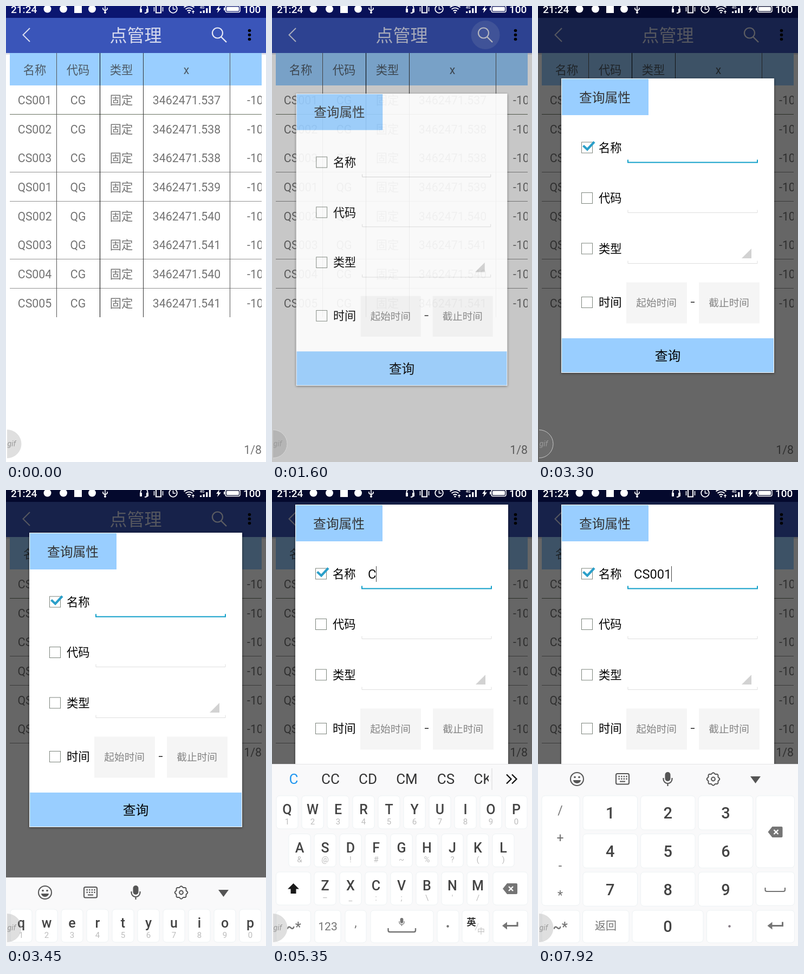
Recreate the animation shown at these times as an HTML page. Size 480 px wide and 844 px high, loop 8000 ms.

```html
<!DOCTYPE html>
<html lang="zh">
<head>
<meta charset="utf-8">
<title>点管理</title>
<style>
html, body { margin: 0; width: 100%; height: 100%; overflow: hidden; background: #fff; }
svg { display: block; width: 480px; height: 844px; }
text { font-family: Roboto, "Noto Sans CJK SC", sans-serif; white-space: pre; }
</style>
</head>
<body>
<svg id="stage" viewBox="0 0 480 844" xmlns="http://www.w3.org/2000/svg"></svg>
<script>
const NS = 'http://www.w3.org/2000/svg';
const stage = document.getElementById('stage');
const LOOP = 8000;
const BLUE = '#99ceff', GREY = '#747474', INK = '#444';

function el(parent, tag, attrs = {}) {
  const node = document.createElementNS(NS, tag);
  for (const k in attrs) node.setAttribute(k, attrs[k]);
  return parent.appendChild(node);
}
const group = (p, attrs) => el(p, 'g', attrs);
const rect = (p, x, y, w, h, fill, more) => el(p, 'rect', { x, y, width: w, height: h, fill, ...more });
const circle = (p, cx, cy, r, fill, more) => el(p, 'circle', { cx, cy, r, fill, ...more });
const shape = (p, d, fill) => el(p, 'path', { d, fill });
const line = (p, d, stroke, width = 1, more) =>
  el(p, 'path', { d, fill: 'none', stroke, 'stroke-width': width, ...more });
// y is the middle of the capitals
function label(p, str, x, y, size, fill, anchor = 'middle', weight = 400) {
  const node = el(p, 'text', {
    x, y: y + size * 0.36, 'font-size': size, fill, 'text-anchor': anchor, 'font-weight': weight
  });
  node.textContent = str;
  return node;
}
function clip(id, x, y, w, h) {
  return rect(el(el(stage, 'defs'), 'clipPath', { id }), x, y, w, h, '#000');
}
const show = (node, on) => node.setAttribute('display', on ? 'inline' : 'none');
const within = (t, ...spans) => spans.some(([a, b]) => t >= a && t < b);
// latest entry of [time, ...values] that has started
const latest = (steps, t) => steps.filter(s => s[0] <= t).pop();

// ---- point list ----
const app = group(stage);
rect(app, 0, 0, 480, 844, '#fff');
rect(app, 0, 87, 480, 3, '#dde0ea');
rect(app, 0, 0, 480, 22, '#0b1670');
rect(app, 0, 22, 480, 65, '#3a55b9');
const touch = circle(app, 394, 53.5, 26.5, '#fff', { opacity: 0.12 });
line(app, 'M44 41L31.5 53.5L44 66', '#d8dcf0', 2);
label(app, '点管理', 239.5, 54, 32, '#d6daee');
circle(app, 390.5, 50, 9.5, 'none', { stroke: '#e8eaf6', 'stroke-width': 2.2 });
line(app, 'M397 57L407 67', '#e8eaf6', 2.4);
[45.5, 53.5, 61.5].forEach(y => circle(app, 449.5, y, 2.8, '#000'));

const tableClip = clip('table', 7, 87, 465, 757);
const table = group(app, { 'clip-path': 'url(#table)' });
rect(table, 7, 87, 465, 60, BLUE);
['名称', '代码', '类型', 'x'].forEach((s, i) => label(table, s, [53, 133, 213, 333][i], 118, 21.3, '#4d5a66'));
const points = ['CS001', 'CS002', 'CS003', 'QS001', 'QS002', 'QS003', 'CS004', 'CS005'];
const tails = [537, 538, 538, 539, 540, 541, 540, 541];
points.forEach((name, i) => {
  const y = 174.5 + 53.65 * i;
  label(table, name, 53, y, 21.3, GREY);
  label(table, name[0] + 'G', 133, y, 21.3, GREY);
  label(table, '固定', 213, y, 21.3, GREY);
  label(table, '3462471.' + tails[i], 333.5, y, 21.3, GREY);
  label(table, '-10', 445, y, 21.3, GREY, 'start');
});
[200, 307, 361, 468, 522].forEach((y, i) => line(table, `M7 ${y + 0.5}H472`, i ? '#929292' : '#66705f'));
[93, 173, 253, 413].forEach((x, i) => line(table, `M${x + 0.5} 87V576`, ['#555', '#000', '#333', '#555'][i]));
const pager = label(app, '1/8', 472, 821.5, 21.3, GREY, 'end');

const dim = rect(stage, 0, 0, 480, 844, '#000');

// ---- query dialog, drawn where it rests above the keyboard ----
const dialog = group(stage, { style: 'filter:drop-shadow(0 1px 2px rgba(0,0,0,.5))' });
rect(dialog, 43, 27, 393, 545, '#fff');
rect(dialog, 44, 28, 160, 67, BLUE);
label(dialog, '查询属性', 123.5, 62, 23.8, '#333');
const press = circle(dialog, 90, 155, 21, '#000', { opacity: 0.12 });
[155, 248.5, 342, 441.5].forEach((y, i) => {
  rect(dialog, 80.5, y - 10, 20, 20, '#fff', { stroke: '#7c847c' });
  label(dialog, ['名称', '代码', '类型', '时间'][i], 112, y, 21.3, '#000', 'start');
});
const field = (y, color, w) => line(dialog, `M166 ${y - 5}V${y}H405V${y - 5}`, color, w);
const idle = field(182.5, '#d3d3d3', 1);
const active = field(182.5, '#119fc9', 2);
field(275.5, '#dedede', 1);
field(369.5, '#dedede', 1);
const tick = line(dialog, 'M83.5 151.5L91 158.5L104 144.5', '#2b9fc9', 4.2);
shape(dialog, 'M394 342V360H376Z', '#d2d2d2');
[[163, '起始时间'], [297, '截止时间']].forEach(([x, s]) => {
  rect(dialog, x, 404.5, 112, 76, '#f5f5f5');
  label(dialog, s, x + 55.7, 442, 18.7, '#858585');
});
rect(dialog, 282, 440.5, 7, 1.5, '#222');
rect(dialog, 44, 508, 391, 63, BLUE);
label(dialog, '查询', 239.5, 540, 23.8, '#000');
const input = label(dialog, '', 177, 155.5, 23.7, '#111', 'start');
const caret = rect(dialog, 0, 141, 1, 29, '#444');

// ---- keyboard ----
const keyboard = group(stage);
rect(keyboard, 0, 507, 480, 337, '#f9f9fa');
line(keyboard, 'M0 507.5H480', '#e4e4e6');

const key = (p, x, y, w, h) => rect(p, x, y, w, h, '#fff', { rx: 6, stroke: '#edf2f4' });
function backspace(p, x, y) {
  shape(p, `M${x - 14} ${y}L${x - 6} ${y - 10}H${x + 11}Q${x + 13} ${y - 10} ${x + 13} ${y - 8}V${y + 8}Q${x + 13} ${y + 10} ${x + 11} ${y + 10}H${x - 6}Z`, '#757575');
  line(p, `M${x - 3} ${y - 4}l8 8m0 -8l-8 8`, '#fff', 2.4);
}
function enter(p, x, y) {
  line(p, `M${x - 8} ${y}H${x + 13}V${y - 7}`, '#757575', 3);
  shape(p, `M${x - 15} ${y}l9 -7v14Z`, '#757575');
}
function mic(p, x, y, k, color) {
  const g = group(p, { transform: `translate(${x} ${y}) scale(${k})` });
  rect(g, -5, -13, 10, 17, color, { rx: 5 });
  line(g, 'M-8 -2V0A8 8 0 0 0 8 0V-2M0 8V13', color, 2.2);
}

const tools = group(keyboard);
circle(tools, 72, 535, 12, 'none', { stroke: '#555', 'stroke-width': 2 });
circle(tools, 68, 531.5, 1.8, '#555');
circle(tools, 76, 531.5, 1.8, '#555');
shape(tools, 'M65 537H79A7 6 0 0 1 65 537Z', '#555');
rect(tools, 144, 525, 24, 19.5, 'none', { rx: 2.5, stroke: '#555', 'stroke-width': 2 });
for (let i = 0; i < 8; i++) rect(tools, 148.5 + (i % 4) * 4.6, 529 + (i >> 2) * 4.5, 2.4, 2.4, '#555');
rect(tools, 151, 538.5, 10, 2, '#555');
mic(tools, 239.5, 535, 1, '#555');
let cog = '';
for (let i = 0; i <= 64; i++) {
  const a = i / 64 * 2 * Math.PI, r = 10.8 + Math.cos(8 * a);
  cog += `${i ? 'L' : 'M'}${323.5 + r * Math.cos(a)} ${535 + r * Math.sin(a)}`;
}
line(tools, cog + 'Z', '#555', 2);
circle(tools, 323.5, 535, 3.4, 'none', { stroke: '#555', 'stroke-width': 2 });
shape(tools, 'M392 530H411L401.5 543Z', '#555');

clip('words', 0, 510, 400, 50);
const words = group(keyboard);
const list = group(words, { 'clip-path': 'url(#words)' });
[['C', 40], ['CC', 108], ['CD', 177], ['CM', 249], ['CS', 321], ['CK', 389]].forEach(([s, x], i) =>
  label(list, s, x, 535, 26, i ? '#333' : '#1e96f0'));
line(words, 'M406 515V555', '#d8d8d8');
line(words, 'M433 526.5L441.5 535L433 543.5M443 526.5L451.5 535L443 543.5', '#111', 2.3);

const letters = group(keyboard);
const caps = [];
[['qwertyuiop', '1234567890', 28, 566], ['asdfghjkl', '&@!#~%?()', 51, 636.5], ['zxcvbnm', '–_:;\\\'/', 98, 707]]
  .forEach(([row, hints, x0, y]) => [...row].forEach((ch, i) => {
    const x = x0 + 47 * i;
    key(letters, x - 20, y, 40, 61);
    caps.push([label(letters, '', x, y + 25, 25, INK, 'middle', 500), ch]);
    label(letters, hints[i], x, y + 47.5, 15, '#bcbcbc');
  }));
const shiftKey = key(letters, 7.5, 707, 64, 61);
const shiftArrow = shape(letters, 'M39.5 728L50 738.5H44.5V747H34.5V738.5H29Z', GREY);
key(letters, 408, 707, 64, 61);
backspace(letters, 440, 738);
[[7.5, 64], [79, 48], [135, 39], [182, 116], [305, 40], [351, 50], [408, 64]].forEach(([x, w]) => key(letters, x, 778, w, 60));
label(letters, '~*', 40, 809, 25, GREY, 'middle', 500);
label(letters, '123', 103, 807, 21, GREY);
label(letters, ',', 154.5, 800, 22, GREY);
const english = label(letters, 'English', 239.5, 807, 20, '#333', 'middle', 500);
const spaceIcon = group(letters);
mic(spaceIcon, 239.5, 799.5, 0.58, GREY);
line(spaceIcon, 'M214.5 811V815Q214.5 818 217.5 818H262Q265 818 265 815V811', GREY, 2.4);
circle(letters, 324.5, 807.5, 2.2, GREY);
label(letters, '英', 368, 800, 17.5, '#333', 'middle', 700);
line(letters, 'M375 815L381 802', '#c4c4c4');
label(letters, '中', 386, 815.5, 14, '#c0c0c0');
enter(letters, 440, 806.5);

const pad = group(keyboard);
key(pad, 7, 566, 70, 203);
['/', '+', '-', '*'].forEach((s, i) => label(pad, s, 41, 592.5 + 51 * i + (i > 2 ? 4 : 0), 23, GREY));
const digitKeys = [];
function digit(n, x, y, w, h) {
  digitKeys[n] = key(pad, x, y, w, h);
  label(pad, n, x + w / 2, y + h / 2 + 0.5, 29, INK, 'middle', 500);
}
for (let i = 0; i < 9; i++) digit(i + 1, 83 + (i % 3) * 106.6, 566 + Math.floor(i / 3) * 70.6, 100.5, 63);
key(pad, 402.5, 566, 71, 133);
backspace(pad, 438.5, 633);
key(pad, 402.5, 707, 71, 62);
line(pad, 'M419.5 736V740Q419.5 743 422.5 743H453Q456 743 456 740V736', GREY, 2.2);
key(pad, 7, 778, 70, 60);
label(pad, '~*', 41, 809, 25, GREY, 'middle', 500);
key(pad, 82.5, 778, 85.5, 60);
label(pad, '返回', 125, 807, 20, GREY);
digit(0, 174, 778, 131, 59);
key(pad, 311.5, 778, 85, 60);
circle(pad, 353.5, 807.5, 2.2, '#857a85');
key(pad, 402.5, 778, 71, 60);
enter(pad, 438.5, 806.5);

const bubble = group(keyboard);
rect(bubble, -33, 0, 66, 70, '#fff', { rx: 8, stroke: '#e2e2e2' });
const bubbleText = label(bubble, '', 0, 34, 32, INK, 'middle', 500);

// ---- floating recorder button ----
clip('edge', 2, 780, 40, 62);
const recorder = group(stage, { 'clip-path': 'url(#edge)' });
circle(recorder, 2, 810.5, 26, '#808080', { 'fill-opacity': 0.25, stroke: '#ddd', 'stroke-opacity': 0.8 });
label(recorder, 'gif', 2.5, 810, 14, '#9a9a9a', 'start').setAttribute('font-style', 'italic');

// ---- status bar ----
const bar = group(stage);
label(bar, '21:24', 9, 6, 19, '#fff', 'start', 500);
[76.5, 106, 159].forEach(x => circle(bar, x, 5.5, 7, '#fff'));
rect(bar, 126, -1, 14, 14, '#fff');
line(bar, 'M183 0V12M179 3V6L183 9L187 6V3', '#fff', 1.6);
circle(bar, 183, 12, 2, '#fff');
line(bar, 'M248.5 7V4A6.5 6.5 0 0 1 261.5 4V10Q261 13 256 13', '#fff', 1.8);
rect(bar, 247, 5, 4, 7, '#fff', { rx: 1 });
rect(bar, 259, 5, 4, 7, '#fff', { rx: 1 });
rect(bar, 277, -1, 9, 13.5, 'none', { stroke: '#fff', 'stroke-width': 2 });
line(bar, 'M273.5 2V10M289.5 2V10', '#fff', 1.6);
circle(bar, 308.5, 5.5, 7.3, 'none', { stroke: '#fff', 'stroke-width': 1.8 });
line(bar, 'M308.5 1V6H313', '#fff', 1.6);
line(bar, 'M328.5 2.5Q338 -4.5 347.5 2.5M331.5 6Q338 1 344.5 6M334.5 9.3Q338 6.8 341.5 9.3', '#fff', 1.9);
circle(bar, 338, 12, 1.6, '#fff');
const traffic = shape(bar, 'M342.5 11L345.5 8L348.5 11H346.3V14H344.7V11Z', '#fff');
label(bar, '4G', 362, 2, 7, '#fff', 'middle', 500);
[3, 5, 9, 14].forEach((h, i) => rect(bar, 358 + i * 5.6, 13 - h, 3.2, h, '#fff'));
shape(bar, 'M394 -1L388 7H391.5L390 13L397 4.5H393Z', '#fff');
rect(bar, 405, -0.5, 27, 12, 'none', { rx: 3, stroke: '#fff', 'stroke-width': 1.5 });
rect(bar, 407, 1.5, 23, 8, '#fff', { rx: 1.5 });
rect(bar, 402, 3, 2.5, 5, '#fff');
label(bar, '100', 438, 6, 19, '#fff', 'start', 500);

// ---- timeline ----
// time, scale, opacity, dimming
const opening = [[0, 1, 0, 0], [1420, 0.93, 0.25, 0.04], [1510, 0.97, 0.65, 0.12],
  [1600, 0.992, 0.91, 0.22], [1690, 1, 1, 0.48], [1880, 1, 1, 0.6]];
// time, dialog offset, keyboard offset
const rising = [[0, 133, 340], [3300, 107, 340], [3400, 52, 210], [3480, 18, 90], [3560, 4, 30], [3650, 0, 6], [3730, 0, 0]];
const typed = [[0, ''], [5180, 'C'], [6530, 'CS'], [7180, 'CS0'], [7430, 'CS00'], [7920, 'CS001']];
const flips = [560, 2900, 4280, 5090, 6380, 7520];
const popups = [[5000, 5180, 'C', 192, 616], [6320, 6380, 'S', 98, 545]];

function draw(t) {
  const [, scale, alpha, dark] = latest(opening, t);
  const [, lift, drop] = latest(rising, t);
  show(touch, within(t, [770, 1690]));
  dim.setAttribute('opacity', dark);
  dialog.setAttribute('opacity', alpha);
  show(dialog, alpha > 0);
  dialog.setAttribute('transform', `translate(239.5 432) scale(${scale}) translate(-239.5 ${lift - 432})`);

  const focused = t >= 2380;
  show(press, within(t, [2380, 2480]));
  show(tick, focused);
  show(active, focused);
  show(idle, !focused);
  input.textContent = latest(typed, t)[1];
  const end = input.textContent ? input.getComputedTextLength() : 0;
  caret.setAttribute('x', Math.floor(177 + end));
  show(caret, within(t, [4120, 4340], [5180, 5640], [5960, 6320], [6530, 7120], [7180, LOOP]));

  const resized = t >= 3400;
  tableClip.setAttribute('height', resized ? 382 : 757);
  pager.setAttribute('y', resized ? 492.5 : 829);

  const upper = within(t, [4500, 5450], [5960, 6600]);
  const numeric = t >= 6600;
  const suggesting = within(t, [5180, 6700]);
  show(keyboard, drop < 340);
  keyboard.setAttribute('transform', `translate(0 ${drop})`);
  show(tools, !suggesting);
  show(words, suggesting);
  show(letters, !numeric);
  show(pad, numeric);
  caps.forEach(([node, ch]) => { node.textContent = upper ? ch.toUpperCase() : ch; });
  shiftArrow.setAttribute('fill', upper ? '#1a1a1a' : GREY);
  shiftKey.setAttribute('fill', within(t, [4500, 4570]) ? '#ececec' : '#fff');
  show(english, t < 4570);
  show(spaceIcon, t >= 4570);
  digitKeys[0].setAttribute('fill', within(t, [7120, 7180]) ? '#ececec' : '#fff');
  digitKeys[1].setAttribute('fill', within(t, [7430, 7620]) ? '#ececec' : '#fff');

  const popup = popups.find(p => within(t, p));
  show(bubble, popup);
  if (popup) {
    bubbleText.textContent = popup[2];
    bubble.setAttribute('transform', `translate(${popup[3]} ${popup[4]})`);
  }
  show(traffic, flips.filter(f => f <= t).length % 2 === 0);
}

function tick60() {
  draw(performance.now() % LOOP);
  requestAnimationFrame(tick60);
}
tick60();
</script>
</body>
</html>
```
